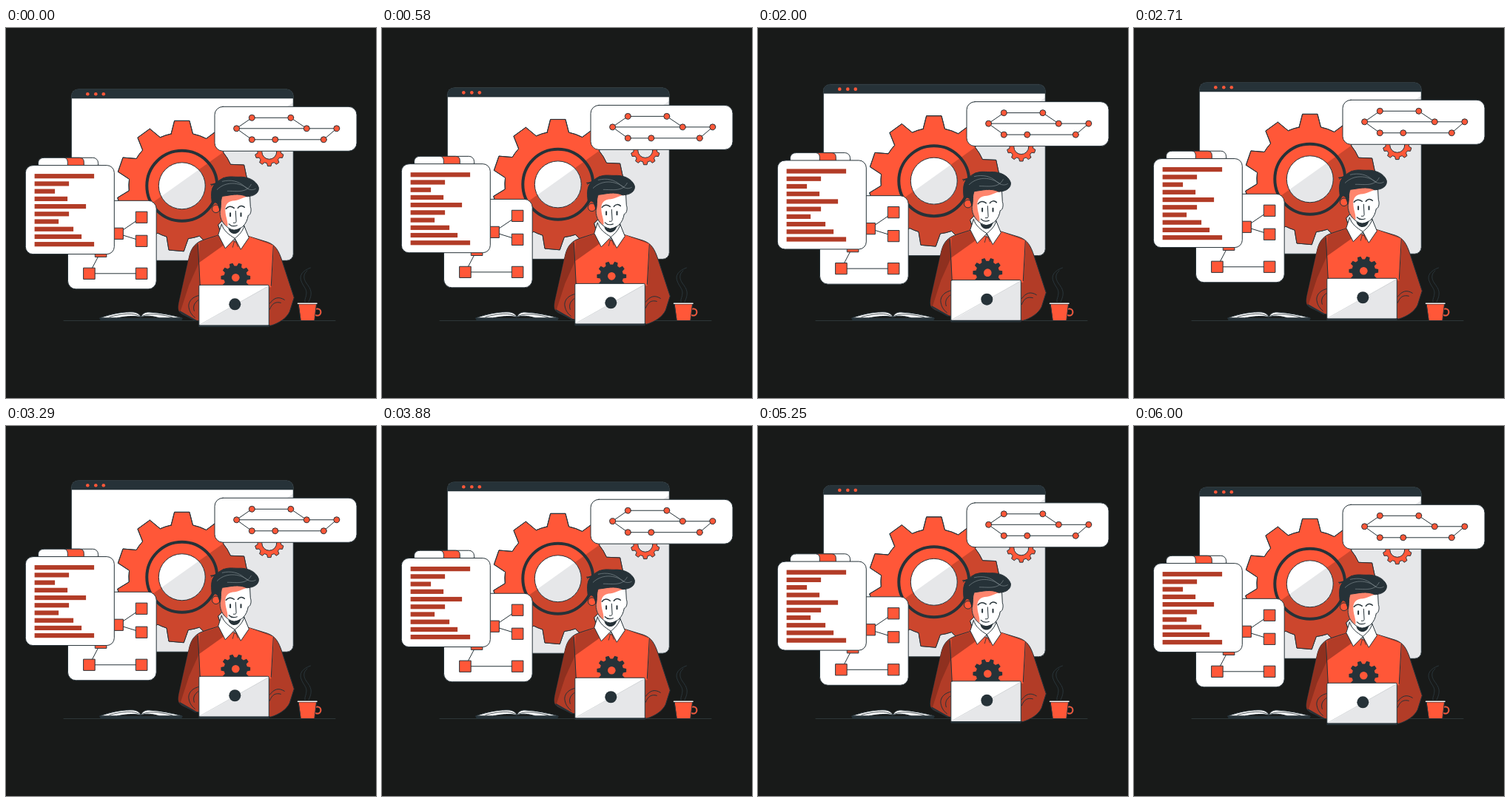
Recreate the animation shown at these times as an HTML page with a canvas. Size 500 by 500 pixels, loop 6040 ms.

```html
<!DOCTYPE html>
<html lang="en">
<head>
<meta charset="utf-8">
<title>Developer at work</title>
<style>
html, body { margin: 0; width: 100%; height: 100%; overflow: hidden; background: #181a19; }
canvas { display: block; width: 500px; height: 500px; }
</style>
</head>
<body>
<canvas id="stage"></canvas>
<script>
const LOOP = 6040, HALF = 3000, LIFT = 10;
const BG = '#181a19', INK = '#263238', WHITE = '#fff', GREY = '#e6e7e9';
const RED = '#ff5738', SHADE = '#cc462d', DEEP = '#b23c27', DARK = '#8f301f';

const canvas = document.getElementById('stage');
const ctx = canvas.getContext('2d');
const ratio = window.devicePixelRatio || 1;
canvas.width = canvas.height = 500 * ratio;

function paint(path, fill, stroke = INK, width = 1) {
  const p = typeof path === 'string' ? new Path2D(path) : path;
  if (fill) { ctx.fillStyle = fill; ctx.fill(p); }
  if (stroke) { ctx.strokeStyle = stroke; ctx.lineWidth = width; ctx.stroke(p); }
}

function circle(x, y, r, fill, stroke, width) {
  const p = new Path2D();
  p.arc(x, y, r, 0, Math.PI * 2);
  paint(p, fill, stroke, width);
}

function box(x, y, w, h, r, fill, stroke) {
  const p = new Path2D();
  p.roundRect(x, y, w, h, r);
  paint(p, fill, stroke);
  return p;
}

function clipTo(path, draw) {
  ctx.save();
  ctx.clip(path);
  draw();
  ctx.restore();
}

// Teeth angles are in degrees, clockwise from the top.
function gearPath(x, y, inner, outer, angles, tip, base) {
  const p = new Path2D();
  const at = (deg, r) => {
    const a = (deg - 90) * Math.PI / 180;
    return [x + r * Math.cos(a), y + r * Math.sin(a)];
  };
  angles.forEach((a, i) => {
    const next = i + 1 < angles.length ? angles[i + 1] : angles[0] + 360;
    if (!i) p.moveTo(...at(a - base, inner));
    p.lineTo(...at(a - tip, outer));
    p.lineTo(...at(a + tip, outer));
    p.lineTo(...at(a + base, inner));
    p.arc(x, y, inner, (a + base - 90) * Math.PI / 180, (next - base - 90) * Math.PI / 180);
  });
  p.closePath();
  return p;
}

const evenTeeth = (n, start = 0) => Array.from({ length: n }, (_, i) => start + i * 360 / n);

const halfWindow = new Path2D('M388 100 L88 314 H388 Z');
const bigGear = gearPath(237.5, 213, 71.8, 88.5, [0, 39, 78, 113, 149, 185, 219, 253, 289, 324], 6.6, 11.8);
const smallGear = gearPath(355.5, 167, 15.8, 19.5, evenTeeth(10), 6.6, 11.8);
const shirtGear = gearPath(310, 337, 15.8, 20, evenTeeth(10, 18), 6.6, 11.8);

function drawDesk() {
  paint('M78 395.5 H445', null, '#303a3c', 0.9);
  paint('M411.5 324 C400 328 396 335 399 342 C402 350 406 352 406 358 C406 364 403 366 404 370', null, '#29353a', 1);
  paint('M407 328 C401 333 402 339 406 345 C412 353 415 358 409 370', null, '#29353a', 1);
  circle(420.8, 384, 4.6, null, INK, 3);
  circle(420.8, 384, 4.6, null, RED, 1.8);
  paint('M395.5 373 H419.5 L416.8 395.5 H398.6 Z', RED);
  paint('M394.5 372.3 H420', null, '#f4f4f4', 1.6);
}

function drawBook() {
  paint('M126 392 H239 L237 395.5 H128 Z', INK, null);
  paint('M127 391.8 C143 386 160 383 173 384 C178 385 181 387 182 391 C174 388 160 390 150 391.8 Z', WHITE);
  paint('M182 391 C184 386 188 383.5 194 384 C209 385 224 388 238 391.8 L207 391.8 C198 389 188 388 182 391 Z', WHITE);
  paint('M140 390.5 C156 386 174 384 181 390 M183 390 C190 385 207 386 225 391', null, INK, 0.8);
}

function drawWindow() {
  const frame = box(88, 82.5, 300, 231.5, 9, WHITE, null);
  clipTo(frame, () => {
    paint(halfWindow, GREY, null);
    ctx.fillStyle = INK;
    ctx.fillRect(88, 82, 300, 13);
  });
  paint(frame, null);
  [110, 121, 131.5].forEach(x => circle(x, 89, 2.3, RED, null));

  paint(smallGear, RED);
  circle(355.5, 167, 10, GREY);

  paint(bigGear, RED);
  clipTo(bigGear, () => paint(halfWindow, SHADE, null));
  paint(bigGear, null);
  circle(237.5, 213, 47.5, null, INK, 4);
  const hole = new Path2D();
  hole.arc(237.5, 213, 31.5, 0, Math.PI * 2);
  paint(hole, WHITE, null);
  clipTo(hole, () => paint(halfWindow, GREY, null));
  paint(hole, null);
}

function drawGraph() {
  box(281.7, 106, 192, 60, 11, WHITE);
  paint('M406 135.5 L384.5 121 H332 L311 135.5 H446.5 L429 150.5 H332 L311 135.5', null);
  const rows = [[121, 332, 384.5], [135.5, 311.3, 406, 446.5], [150.5, 332, 363.5, 429]];
  rows.forEach(([y, ...xs]) => xs.forEach(x => circle(x, y, 4, RED)));
}

function drawTree() {
  box(83.2, 233, 119.7, 119.5, 11, WHITE);
  paint('M183 255.5 L150.5 277.5 L183 287.5 M150.5 277.5 L128 301.5 L112.3 331.5 H183', null);
  [[183, 255.5], [183, 287.5], [150.5, 277.5], [128, 301.5], [112.3, 331.5], [183, 331.5]]
    .forEach(([x, y]) => box(x - 7.6, y - 7.6, 15.2, 15.2, 0, RED));
}

function drawList() {
  box(43.2, 175, 81, 22, 7, WHITE);
  paint('M79 175 H99 Q105 175 105 181 V188 H83 V181 Q83 176 79 175 Z', RED);
  box(26, 185.3, 120, 120, 10, WHITE);
  ctx.fillStyle = DEEP;
  [119, 85, 66, 83, 108, 85, 71, 91, 102, 119].forEach((end, i) => {
    ctx.fillRect(38.3, 196.8 + i * 10.22, end - 38.5, 6.2);
  });
}

function drawBody() {
  paint('M289 279 C276 283 265 286 260 289 C252 294 249 301 247 310 L234 368 C231 381 233 384 239 387 L256 395 L270 397 H350 L357 402 C368 399 379 392 383 383 L389 364 L373 315 C368 300 364 293 353 289 L327 281 Z', DEEP);
  paint('M259 291 C252 295 249 302 247 310 L234 368 C232 377 232 381 235 384 L247 347 L260 318 Z', DARK, null);
  paint('M290 279 L260 290 L262 350 H358 L362 294 L327 281 L310 290 Z', RED, null);
  paint('M290 279 L261 289.5 L260.5 317 L297 291 Z', DEEP, null);
  paint('M259 292 L262 348 M361 294 L358 348', null);
  paint('M235 383 L256 395', null, INK, 2);
  paint('M261 361 C252 363 247 368 246.5 375 C247 382 250 387 255 391 M260 367 C254 371 252 376 254 382', null);
  paint('M356 372 C362 364 368 362 376 367 M356 380 C359 372 364 369 371 371', null);
}

function drawHead() {
  paint('M296 261 L292 279 L309 288 L324 281 L321 262 Z', WHITE, null);

  circle(283.5, 244, 5.3, RED);
  const face = new Path2D('M288 224 L289 252 C290 262 298 271 308 273 C318 272 325 265 327 253 C330 253 332 246 330 241 L329 222 Z');
  paint(face, WHITE, null);
  clipTo(face, () => {
    paint('M286 222 H332 V228 C326 225 317 232 309 233 C300 233 296 238 296 245 C296 255 300 260 299 268 L288 262 Z', '#ff856d', null);
  });
  paint(face, null);
  paint('M300 270 C306 274 312 273 317 269 C316 280 302 281 300 270 Z', INK, null);

  paint('M297 244 C300 240 304 240 308 243 M313 243 C315 240 319 239 322 242', null, INK, 1.5);
  paint('M302.8 250 V254 M317.2 250 V254', null, INK, 2);
  paint('M310 247 L310.8 261 Q311 263.5 307 263', null, INK, 1);
  paint('M301 264.5 Q305 269 312 266.5', null, INK, 1.2);

  paint('M276.5 211 C281 211 286 208 290 205 C297 199 306 201 313 201 C327 200 338 206 341 215 C342 222 336 227 325 227.5 C314 222 302 226 292 227 C289 233 291 240 289 247 L286 238 C283 234 280 235 278.5 239 C277 229 276 217 281 212 Z', INK);
  paint('M277 213 Q282 208 290 209 M283 210 Q287 205 294 202', null);
  paint('M285 218 C296 207 314 207 327 217 M292 207 C304 204 314 207 321 213 C326 218 332 220 337 217 M299 220 C312 220 325 223 331 211', null, '#7d888d', 0.7);

  paint('M291 265 L286.5 279 L296 297.5 L309 284 C301 279 294 274 291 265 Z', WHITE);
  paint('M321.5 267 L328 283 L317 299 L309 284 C315 279 320 274 321.5 267 Z', WHITE);
  paint('M309 285 L306 296 M309 285 L313 295', null, INK, 0.8);
}

function drawLaptop() {
  paint(shirtGear, INK, null);
  circle(310, 337, 5.3, RED, null);
  const lid = box(260.5, 347, 94.5, 55, 1.5, WHITE, null);
  clipTo(lid, () => paint('M355 348 L261 402 H355 Z', GREY, null));
  paint('M355 348 L261 401', null, '#b9bec1', 0.6);
  paint(lid, null);
  circle(309, 373, 8, INK, null);
  box(260, 401.2, 95.5, 2.6, 1, INK, null);
}

function render(now) {
  const t = now % LOOP;
  const lift = LIFT * Math.max(0, 1 - Math.abs(t / HALF - 1));
  ctx.setTransform(ratio, 0, 0, ratio, 0, 0);
  ctx.lineJoin = ctx.lineCap = 'round';
  ctx.fillStyle = BG;
  ctx.fillRect(0, 0, 500, 500);
  drawDesk();
  ctx.save();
  ctx.translate(0.3, 0.3 - lift);
  [drawWindow, drawGraph, drawTree, drawList, drawBody, drawHead, drawLaptop].forEach(draw => draw());
  ctx.restore();
  drawBook();
}

let start;
function tick(now) {
  if (start === undefined) start = now;
  render(now - start);
  requestAnimationFrame(tick);
}
render(0);
requestAnimationFrame(tick);
</script>
</body>
</html>
```
